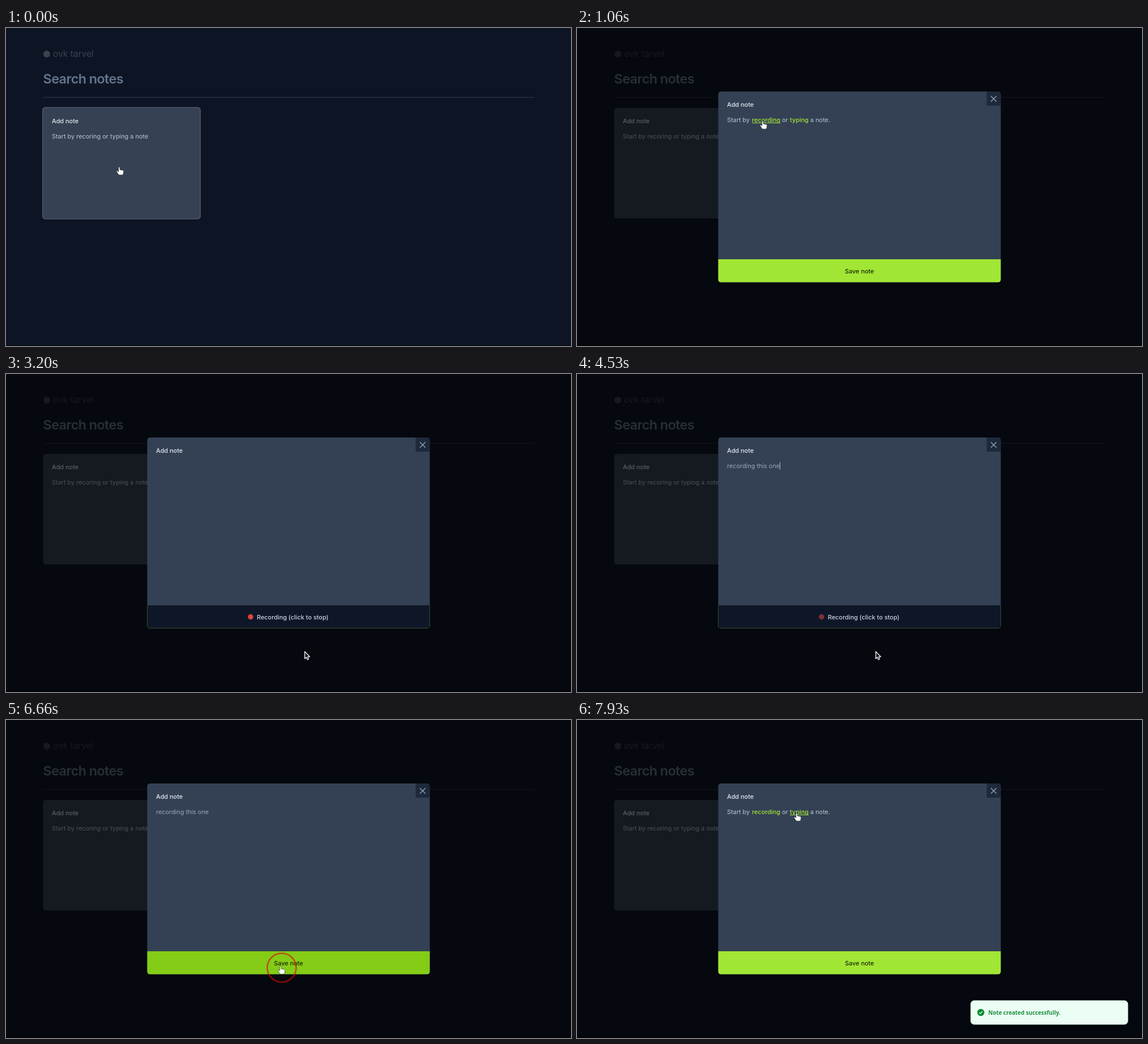
Write an HTML page that moves like this. It is 998 px wide and 561 px high and loops after 8 s.

```html
<!DOCTYPE html>
<html lang="en">
<head>
<meta charset="utf-8">
<title>Notes</title>
<style>
html, body { margin: 0; width: 100%; height: 100%; overflow: hidden; background: #0d1525; }
svg { display: block; width: 998px; height: 561px; }
text { font: 400 10.9px Inter, sans-serif; fill: #bcc6d3; }
.med { font-weight: 500; }
.head { fill: #e2e8f0; font-weight: 500; }
.link { fill: #a3e635; font-weight: 500; }
.typed { fill: #9aa7b9; }

/* One shared 8 s clock; percentages are ms / 80. */
.t { animation: 8s step-end infinite; }
.hover { animation-name: hover; }
.modal { animation-name: modal; }
.intro { animation-name: intro; }
.editor { animation-name: editor; }
.bar { animation-name: bar; }
.saveBg { animation-name: saveBg; }
.underA { animation-name: underA; }
.underB { animation-name: underB; }
.words { animation-name: words; }
.focus { animation-name: focus; }
.caretPos { animation-name: caretPos; }
.hand { animation-name: hand; }
.arrow { animation-name: arrow; }
.caret { animation: blink 1s step-end -.6s infinite; }
.dot { animation: pulse 2s cubic-bezier(.4, 0, .6, 1) -.6s infinite; }
.cursor { animation: move 8s ease-in-out infinite; }
.ring { fill: none; stroke: #d40a0f; stroke-width: 2.6; animation: ring 8s linear calc(var(--at) - 8s) infinite; }
.toast { animation: toast 8s ease infinite; }

@keyframes hover { 0% { opacity: 1 } 2.5%, 100% { opacity: 0 } }
@keyframes modal { 0% { opacity: 0 } 2.5%, 100% { opacity: 1 } }
@keyframes intro { 0% { opacity: 1 } 17.5% { opacity: 0 } 84.75%, 100% { opacity: 1 } }
@keyframes editor { 0% { opacity: 0 } 17.5% { opacity: 1 } 84.75%, 100% { opacity: 0 } }
@keyframes bar { 0% { opacity: 0 } 17.5% { opacity: 1 } 74.375%, 100% { opacity: 0 } }
@keyframes saveBg { 0% { fill: #a2e635 } 74.375% { fill: #84cc16 } 88.5%, 100% { fill: #a2e635 } }
@keyframes underA { 0% { opacity: 0 } 11.875% { opacity: 1 } 17.5%, 100% { opacity: 0 } }
@keyframes underB { 0% { opacity: 0 } 97.25%, 100% { opacity: 1 } }
@keyframes words { 0% { opacity: 0 } 55%, 100% { opacity: 1 } }
@keyframes focus { 0% { opacity: 1 } 73.75%, 100% { opacity: 0 } }
@keyframes caretPos { 0% { transform: none } 55%, 100% { transform: translateX(93px) } }
@keyframes hand {
  0% { opacity: 1 } 2.5% { opacity: 0 } 11.875% { opacity: 1 } 19.5% { opacity: 0 }
  67.25% { opacity: 1 } 88.5% { opacity: 0 } 97.25%, 100% { opacity: 1 }
}
@keyframes arrow {
  0% { opacity: 0 } 2.5% { opacity: 1 } 11.875% { opacity: 0 } 19.5% { opacity: 1 }
  67.25% { opacity: 0 } 88.5% { opacity: 1 } 97.25%, 100% { opacity: 0 }
}
@keyframes blink { 0% { opacity: 1 } 50%, 100% { opacity: 0 } }
@keyframes pulse { 50% { opacity: .5 } }
@keyframes move {
  0%, 5.6% { transform: translate(202px, 252px) }
  13%, 19.4% { transform: translate(330px, 171px) }
  22.4%, 37.5% { transform: translate(522px, 464px) }
  39.5%, 64.5% { transform: translate(531px, 497px) }
  68.5%, 87% { transform: translate(487px, 441px); animation-timing-function: ease-in }
  91% { transform: translate(535px, 345px); animation-timing-function: linear }
  92.5% { transform: translate(505px, 305px); animation-timing-function: linear }
  94.5% { transform: translate(455px, 255px); animation-timing-function: linear }
  96.3% { transform: translate(410px, 215px); animation-timing-function: ease-out }
  98.4%, 100% { transform: translate(390px, 171px) }
}
@keyframes ring {
  0%, .4% { r: 25.5px; opacity: .62 }
  4.25% { r: 0; opacity: .62 }
  4.26%, 100% { r: 0; opacity: 0 }
}
@keyframes toast {
  0%, 84.75% { transform: translateY(42px); opacity: 0 }
  89.75%, 100% { transform: none; opacity: 1 }
}
</style>
</head>
<body>
<svg viewBox="0 0 998 561">
  <defs>
    <clipPath id="box"><rect x="249.5" y="112" width="499" height="336.6" rx="4.7"/></clipPath>
    <filter id="shade" x="-10%" y="-30%" width="120%" height="180%">
      <feDropShadow dx="0" dy="3" stdDeviation="4.5" flood-opacity=".1"/>
    </filter>
  </defs>

  <!-- page -->
  <rect width="998" height="561" fill="#0d1525"/>
  <circle cx="72" cy="46" r="6" fill="#39424f"/>
  <text x="83" y="51" style="font-size:15.5px;fill:#39424f">ovk tarvel</text>
  <text x="65.5" y="97.5" style="font-size:23.4px;font-weight:600;letter-spacing:-.585px;fill:#64748b">Search notes</text>
  <rect x="65.5" y="121.8" width="868" height="1" fill="#303c4d"/>
  <rect class="t hover" x="64" y="139.4" width="280" height="198" rx="5.5" fill="#4b586b"/>
  <rect x="65.5" y="141" width="277" height="195" rx="4.7" fill="#364153"/>
  <text class="head" x="81" y="168">Add note</text>
  <text x="81" y="194.7">Start by recoring or typing a note</text>

  <!-- dialog -->
  <g class="t modal">
    <rect width="998" height="561" fill-opacity=".6"/>
    <g clip-path="url(#box)">
      <rect x="249" y="112" width="500" height="337" fill="#344155"/>
      <rect x="723.6" y="112" width="25" height="25" fill="#1e293b"/>
      <path d="M731.5 120.4l9 9m0-9l-9 9" stroke="#94a3b8" stroke-width="1.4" stroke-linecap="round"/>
      <rect class="t saveBg" x="249" y="408" width="500" height="41"/>
      <text class="med" x="499" y="432.5" text-anchor="middle" style="fill:#1a2e05">Save note</text>
      <g class="t bar">
        <rect x="249" y="408" width="500" height="41" fill="#0e1728"/>
        <circle class="dot" cx="432" cy="428.5" r="4.7" fill="#ef4444"/>
        <text class="med" x="443" y="432.5" style="fill:#cbd5e1">Recording (click to stop)</text>
      </g>
    </g>
    <text class="head" x="265" y="139">Add note</text>
    <g class="t intro">
      <text x="265" y="165.8">Start by</text>
      <text class="link" x="309" y="165.8">recording</text>
      <text x="362" y="165.8">or</text>
      <text class="link" x="376" y="165.8">typing</text>
      <text x="412" y="165.8">a note.</text>
      <rect class="t underA" x="309.3" y="167" width="50" height="1" fill="#a3e635"/>
      <rect class="t underB" x="376" y="167" width="33" height="1" fill="#a3e635"/>
    </g>
    <g class="t editor">
      <text class="t words typed" x="265" y="165.8">recording this one</text>
      <g class="t focus"><g class="t caretPos">
        <rect class="caret" x="265" y="155.5" width="1" height="13.5" fill="#a9b5c6"/>
      </g></g>
    </g>
  </g>

  <!-- toast -->
  <g class="toast">
    <rect x="695.5" y="495" width="277.5" height="42" rx="6.2" fill="#ecfdf3" stroke="#d3fde5" stroke-width=".8" filter="url(#shade)"/>
    <circle cx="713.3" cy="516" r="6.2" fill="#008a2e"/>
    <path d="M710.6 516.2l1.9 1.9 3.5-4" fill="none" stroke="#ecfdf3" stroke-width="1.3" stroke-linecap="round" stroke-linejoin="round"/>
    <text x="726.5" y="519.5" style="font:600 9.8px 'Noto Sans',sans-serif;fill:#1a8f42">Note created successfully.</text>
  </g>

  <rect y="560" width="998" height="1"/>

  <!-- pointer -->
  <g class="cursor">
    <circle class="ring" cy="-4" style="--at:.05s"/>
    <circle class="ring" cy="-4" style="--at:1.25s"/>
    <circle class="ring" cy="-4" style="--at:5.9s"/>
    <circle class="ring" cy="-4" style="--at:6.64s"/>
    <path class="t hand" fill="#fff" stroke="#111" stroke-width=".6"
      d="M-3.2-5.6c0-1.6 2.4-1.6 2.4 0v3.6l4.6.9c1.6.3 2.2 1 2 2.4l-.7 4.2c-.2 1.2-.8 1.7-2 1.7h-4.5c-1 0-1.6-.4-2.2-1.2L-6.4 1.6c-.7-1.2.6-2 1.6-1.3l1.6 1.2z"/>
    <path class="t arrow" fill="#14161a" stroke="#f4f4f4" stroke-width="1.3" stroke-linejoin="round"
      d="M-3.3-7.2V5.3L-.6 2.6 1.3 7 3.6 6 1.8 1.8H5.6Z"/>
  </g>
</svg>
</body>
</html>
```
